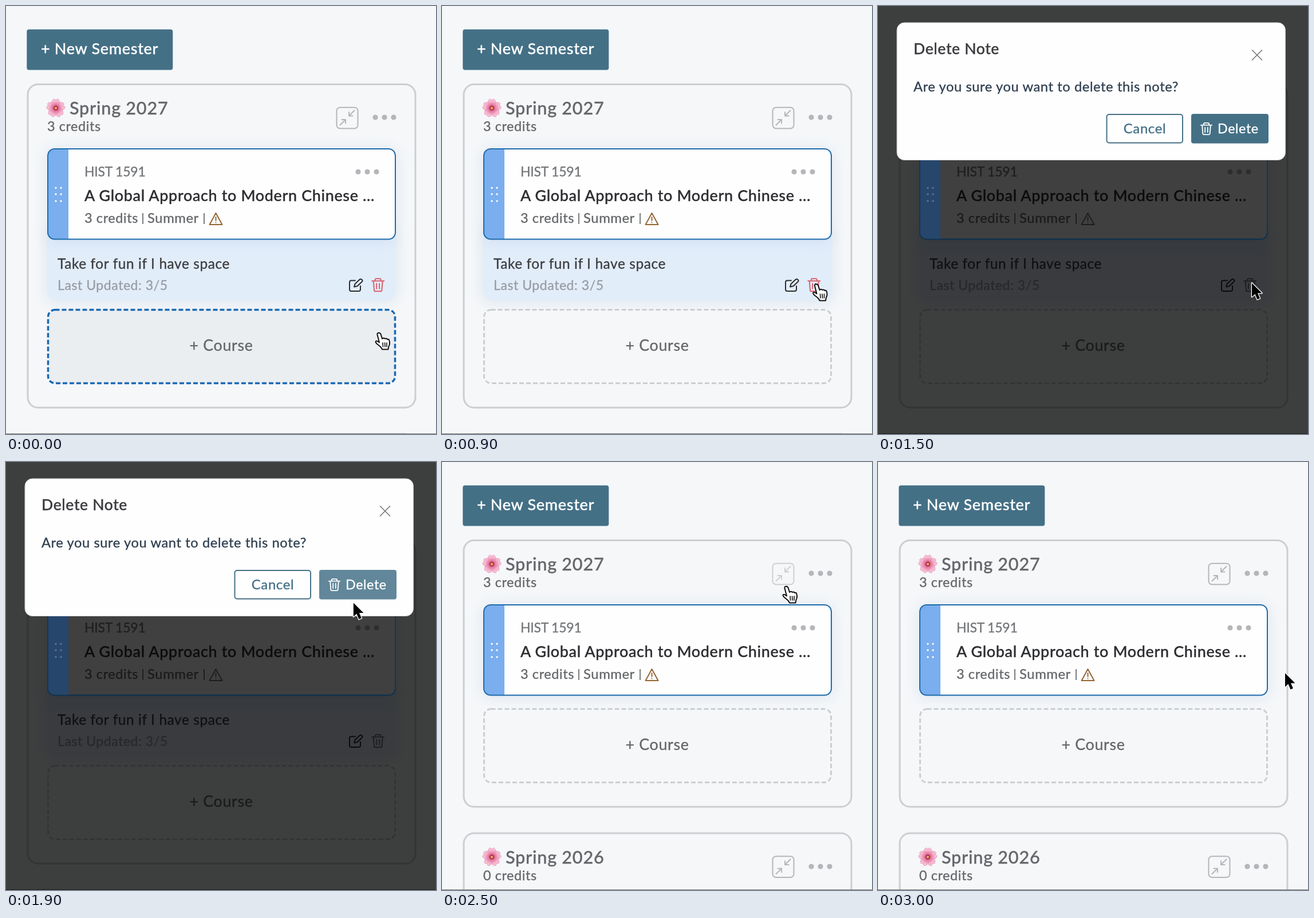
An HTML page for the animation above (3100 ms loop, 751 px wide and 746 px high).

```html
<!DOCTYPE html>
<html lang="en">
<head>
<meta charset="utf-8">
<title>Delete a note</title>
<style>
  html, body { margin: 0; width: 100%; height: 100%; overflow: hidden; background: #f5f7f9; }
  svg { display: block; width: 751px; height: 746px; }
  text {
    font-family: Lato, "Open Sans", sans-serif; letter-spacing: .025em; white-space: pre;
    color: #65676a; fill: currentColor; stroke: currentColor; stroke-width: .35;
  }
  .m { font-weight: 500; }
  .line { fill: none; stroke-width: 2; stroke-linecap: round; stroke-linejoin: round; }
  .panel { fill: #f5f7f9; stroke: #cdced1; stroke-width: 3; }
  .dots { fill: #b5b6b9; }
  .shadow { filter: drop-shadow(0 2px 12px #a9c4e060); }
  .warn { stroke: #956636; }
  .bin { stroke: #d9606b; }
  .dark .warn, .dark .bin { stroke: #777; }
</style>
</head>
<body>
<svg viewBox="0 0 751 746">
  <defs>
    <radialGradient id="pink" gradientUnits="userSpaceOnUse" cx="0" cy="0" r="16">
      <stop offset=".3" stop-color="#dd6a94"/>
      <stop offset=".65" stop-color="#f3a9c6"/>
      <stop offset="1" stop-color="#fbcfe0"/>
    </radialGradient>
    <path id="petal" d="M0 0C-9-6-8-14-3-16L0-14L3-16C8-14 9-6 0 0Z"/>
    <g id="flower">
      <g id="petals" fill="url(#pink)" stroke="#e58cb0" stroke-width=".8"></g>
      <circle r="4.4" fill="#b5374f"/>
      <circle r="2" fill="#efb95a"/>
    </g>
    <g id="collapse" class="line" stroke="#b5b6b9">
      <rect x="577.5" y="176.7" width="37" height="36.8" rx="6"/>
      <path d="M608.500 182L599 191.500M599 185V191.500H605.500M583.500 207.500L593 198M586.500 198H593V204.500"/>
    </g>
    <g id="more" class="dots"><circle r="4.6" cx="-16"/><circle r="4.6"/><circle r="4.6" cx="16"/></g>
    <path id="trash" class="line" d="M-10.5-7H10.5M-5-7V-9Q-5-11-3-11H3Q5-11 5-9V-7M-8-7L-6.7 9Q-6.5 11-4.5 11H4.5Q6.5 11 6.7 9L8-7M-2.5-2.5V6.5M2.5-2.5V6.5"/>
    <path id="bar" d="M85 249H109V406.5H85A12 12 0 0 1 73 394.5V261A12 12 0 0 1 85 249Z"/>
    <rect id="card" x="73" y="249" width="607" height="157.5" rx="12"/>
    <g id="grip"></g>
  </defs>

  <g id="page">
    <rect x="36.3" y="40.7" width="255" height="70.8" rx="4" fill="#447086"/>
    <text class="m" x="61" y="84" font-size="27" style="color:#fff">+ New Semester</text>

    <rect id="semester" class="panel" x="38" y="136.5" width="677" rx="18"/>
    <use href="#flower" x="87" y="178"/>
    <text class="m" x="111" y="189" font-size="30.6">Spring 2027</text>
    <text x="72" y="218" font-size="23.4">3 credits</text>
    <use id="fold" href="#collapse"/>
    <use href="#more" x="661" y="194"/>

    <g id="note">
      <path class="shadow" d="M72 390H681V495Q681 513 663 513H90Q72 513 72 495Z" fill="#e2edfa"/>
      <text x="90" y="458" font-size="24.4" style="color:#3c3e42">Take for fun if I have space</text>
      <text x="90" y="495" font-size="23" style="color:#999da3">Last Updated: 3/5</text>
      <path class="line" stroke="#2b2d30" d="M610 478.5H603Q600 478.5 600 481.5V494Q600 497 603 497H616Q619 497 619 494V488M608 489.5L609.5 484.5L617.5 476.8Q619.5 475 621.5 477T621.8 480.5L613.5 488.3Z"/>
      <use class="bin" href="#trash" x="649.7" y="486.3"/>
    </g>

    <use href="#card" class="shadow" fill="#fefefe"/>
    <use href="#bar" fill="#7aaeee"/>
    <use href="#grip" fill="#fff"/>
    <use href="#card" fill="none" stroke="#1d6bab" stroke-width="2"/>
    <text x="137" y="297" font-size="23" style="letter-spacing:-.01em;color:#747679">HIST 1591</text>
    <use href="#more" x="631" y="289"/>
    <text class="m" x="137" y="339.5" font-size="26.9" style="color:#2c2d30">A Global Approach to Modern Chinese ...</text>
    <text x="137" y="378" font-size="23.5">3 credits</text>
    <text x="247" y="378" font-size="23.8">Summer</text>
    <path d="M239 361V380M346 361V380" stroke="#65676a" stroke-width="1.7"/>
    <path class="line warn" d="M366.500 361L377.500 381H355.500ZM366.500 368V374M366.500 377.500V377.600"/>

    <g id="lower">
      <rect id="add" x="73.5" y="529.5" width="606" height="128" rx="12" stroke-dasharray="8 4"/>
      <text x="376" y="601" font-size="26.8" text-anchor="middle">+ Course</text>
      <rect class="panel" x="38" y="746" width="677" height="300" rx="18"/>
      <g transform="translate(0 609.5)">
        <use href="#flower" x="87" y="178"/>
        <text class="m" x="111" y="189" font-size="30.6">Spring 2026</text>
        <text x="72" y="218" font-size="23.4">0 credits</text>
        <use href="#collapse"/>
        <use href="#more" x="661" y="194.5"/>
      </g>
    </g>
    <path d="M0 745.5H751" stroke="#77787a"/>
  </g>

  <g id="modal">
    <rect width="751" height="746" opacity=".75"/>
    <use href="#bar" fill="#27466c"/>
    <use href="#grip" fill="#60758f"/>
    <use href="#card" fill="none" stroke="#143652" stroke-width="2"/>
    <rect x="33" y="29" width="678.5" height="239.5" rx="13" fill="#fefefe" stroke="#c9cacc"/>
    <text class="m" x="62" y="84" font-size="26.5" style="color:#3a3b3e">Delete Note</text>
    <path class="line" stroke="#77797c" style="stroke-width:1.7" d="M653.5 77L670.5 94M670.5 77L653.5 94"/>
    <text x="62" y="149" font-size="23.7" style="color:#2f3f50">Are you sure you want to delete this note?</text>
    <rect x="399.5" y="189" width="132.5" height="49.5" rx="4" fill="#fff" stroke="#447086" stroke-width="2"/>
    <text x="466" y="222" font-size="24" text-anchor="middle" style="color:#447086">Cancel</text>
    <rect id="confirm" x="547" y="188" width="135" height="51.5" rx="4"/>
    <use href="#trash" transform="translate(573.5 214) scale(.92)" stroke="#fff"/>
    <text x="593" y="222" font-size="23.3" style="color:#fff">Delete</text>
  </g>

  <g id="hand" stroke="#111" stroke-linejoin="round" stroke-linecap="round">
    <path fill="#fff" stroke-width="2" d="M-3 2Q-3.500-1-.8-1.300T3 1L5.500 9Q8 6.500 10.500 9Q13 7.500 14.500 10Q17.500 9 18 12.500Q19.500 18 17 22L16 27.500H5.500Q4 23.500-1 20Q-6 16.500-6 14Q-4.500 11.500-1 14.500L.5 15.500Z"/>
    <path fill="none" stroke-width="1.6" d="M6.500 16L7 23M10 16L10.500 23M13.500 16V23"/>
  </g>
  <path id="arrow" d="M0 0V24L5.500 19L9.500 28.500L14 26.500L10 17.500H17.500Z" stroke="#fff" stroke-width="2.6" paint-order="stroke" stroke-linejoin="round"/>
</svg>
<script>
  const $ = id => document.getElementById(id);
  const set = (id, attrs) => Object.entries(attrs).forEach(([k, v]) => $(id).setAttribute(k, v));
  const show = (id, on) => set(id, { display: on ? 'inline' : 'none' });
  const ramp = (t, a, b) => Math.min(1, Math.max(0, (t - a) / (b - a)));
  const ease = p => p * p * (3 - 2 * p);
  const mix = (a, b, p) => 'rgb(' + a.map((v, i) => Math.round(v + (b[i] - v) * p)) + ')';

  $('petals').innerHTML = [0, 1, 2, 3, 4]
    .map(i => `<use href="#petal" transform="rotate(${i * 72})"/>`).join('');
  $('grip').innerHTML = [87, 96]
    .map(x => [317, 328, 340].map(y => `<circle cx="${x}" cy="${y}" r="1.7"/>`).join('')).join('');

  // Cursor legs: start, end, from x, y, to x, y
  const legs = [
    [0, 600, 651.5, 571, 654, 486],
    [1500, 2000, 653, 483, 601.5, 218],
    [2600, 3000, 601.5, 218, 711, 368]
  ];

  function draw(t) {
    const open = t >= 1500 && t < 2500, deleted = t >= 2500;
    const [a, b, x0, y0, x1, y1] = legs.filter(l => t >= l[0]).pop();
    const p = ease(ramp(t, a, b));
    const x = x0 + (x1 - x0) * p, y = y0 + (y1 - y0) * p;
    const hand = t < 1500 ? y > 527 || y < 498 : t < 2700 && y < 240;
    for (const id of ['hand', 'arrow']) set(id, { transform: `translate(${x} ${y})` });
    show('hand', hand);
    show('arrow', !hand);

    show('modal', open);
    show('note', !deleted);
    set('page', { class: open ? 'dark' : '' });
    set('semester', { height: deleted ? 464.5 : 563.5 });
    set('lower', { transform: `translate(0 ${deleted ? -99 : 0})` });
    set('fold', { opacity: deleted ? .6 + .4 * ramp(t, 2500, 2800) : 1 });

    const leave = ramp(t, 200, 500);
    set('add', {
      fill: mix([234, 238, 241], [245, 247, 249], leave),
      stroke: mix([27, 105, 179], [205, 206, 209], leave),
      'stroke-width': 3.5 - .5 * leave
    });
    set('confirm', { fill: mix([68, 112, 134], [159, 180, 194], ramp(t, 1800, 2100)) });
  }

  const start = performance.now();
  function tick() {
    const t = (performance.now() - start) % 3100;
    draw(Math.floor(t / 100) * 100);
    requestAnimationFrame(tick);
  }
  tick();
</script>
</body>
</html>
```
